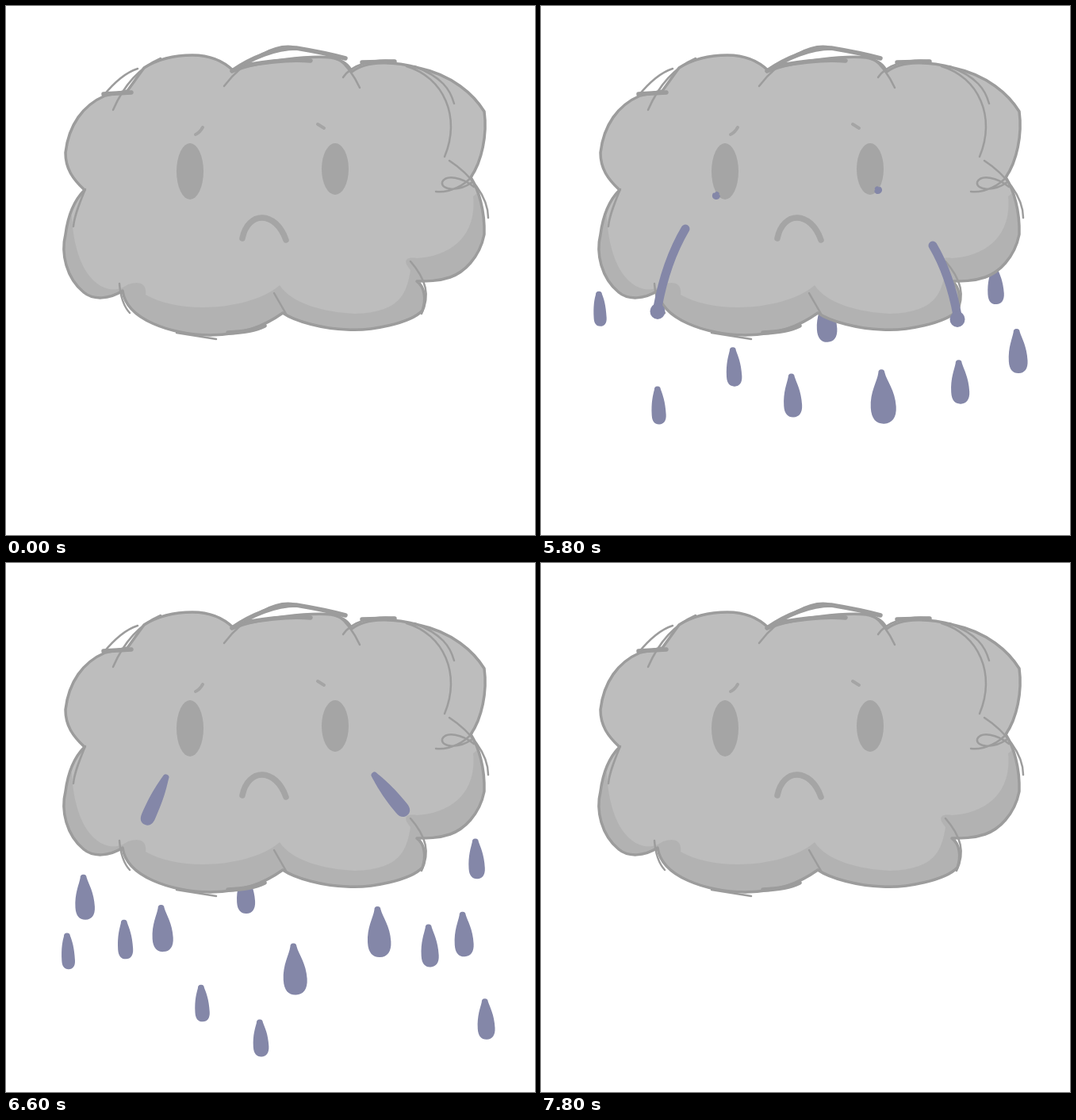
These frames come from a looping animation (667 px wide and 667 px high, 8000 ms). An HTML page with a canvas:

```html
<!DOCTYPE html>
<html lang="en">
<head>
<meta charset="utf-8">
<title>Rain cloud</title>
<style>
  html, body { margin: 0; width: 100%; height: 100%; overflow: hidden; background: #fff; }
  canvas { display: block; width: 100vw; height: 100vh; }
</style>
</head>
<body>
<canvas id="stage" width="667" height="667"></canvas>
<script>
const ctx = document.getElementById('stage').getContext('2d');
const LOOP = 8000, RAIN_START = 5000, STEP = 200, RAIN_STEPS = 14;
const BLUE = '#8487a8', LINE = '#9c9c9c', FEATURE = '#a5a5a5';

const cloud = new Path2D(`M99 232C84 218 75 205 75 185C79 150 97 125 125 113L153 107L174 78
  C193 66 212 62 235 62C258 62 275 70 287 82C320 69 385 62 410 65C425 68 433 76 436 83
  C455 68 490 70 520 78C563 87 590 112 603 133C607 162 600 196 586 216
  C596 232 604 258 603 288C597 318 577 336 560 342C545 347 531 347 518 347
  C528 354 530 370 525 384C510 400 460 410 430 408C400 407 365 398 349 387
  C325 404 300 414 258 415C208 414 152 396 147 359C130 370 110 371 98 361
  C76 343 69 312 75 288C78 265 86 245 99 232Z`);

const litArea = new Path2D(`M60 30H640V200L589 240C594 290 560 316 518 318C503 316 500 322 510 333
  C505 365 495 386 440 388C400 386 360 375 345 352C310 383 220 390 176 364
  C178 350 168 346 154 351C145 357 140 358 130 357C100 350 85 310 83 265L60 200Z`);

const boldLines = new Path2D(`M285 82C310 65 340 53 366 53C390 57 410 61 428 66
  M302 75C335 69 365 67 384 69M123 111L158 109M449 71L490 70M280 412Q310 411 326 403`);

const sketchLines = new Path2D(`M135 131C145 108 163 80 195 66M122 114C135 98 150 84 166 79
  M275 101C300 68 345 42 370 54M425 90C435 75 460 66 490 69
  M418 66C430 75 440 90 446 103M505 76C552 90 574 140 553 190M515 76C550 90 560 105 565 123
  M542 234C560 236 580 225 588 214M559 195C585 212 608 240 608 267
  M588 222C570 235 548 232 550 222C555 212 575 216 590 228
  M510 322C530 345 535 365 524 388M143 350Q145 375 156 387M215 412L265 420
  M100 231C92 250 86 265 85 278M338 362L353 388`);

const brows = new Path2D('M239 162Q244 160 248 153M393 149L401 154');
const mouth = new Path2D('M298 293C305 258 340 258 353 295');
const beads = new Path2D(`M602 254Q606 278 602 300M531 351Q534 364 532 376M142 373L147 390
  M317 409L324 404M417 410Q427 417 436 411`);

const mix = (a, b, u) => a + (b - a) * u;
const smooth = u => u * u * (3 - 2 * u);

function stroke(path, color, width) {
  ctx.strokeStyle = color;
  ctx.lineWidth = width;
  ctx.stroke(path);
}

function ellipse(x, y, rx, ry, color) {
  ctx.fillStyle = color;
  ctx.beginPath();
  ctx.ellipse(x, y, rx, ry, 0, 0, 7);
  ctx.fill();
}

// Teardrop centred on a point, its round end facing (dx, dy).
function drawDrop(x, y, dx, dy, width, height) {
  const r = width / 2, tip = Math.min(4, r * .6), top = -height / 2, bottom = height / 2;
  const shoulder = bottom - Math.min(r * 1.3, height * .5);
  ctx.save();
  ctx.translate(x, y);
  ctx.rotate(Math.atan2(-dx, dy));
  ctx.fillStyle = BLUE;
  ctx.beginPath();
  for (const side of [1, -1]) {
    ctx.moveTo(0, top);
    ctx.quadraticCurveTo(tip * side, top, tip * side, top + tip);
    ctx.bezierCurveTo(tip * 1.5 * side, top + height * .22, r * side, top + height * .4, r * side, shoulder);
    ctx.bezierCurveTo(r * side, bottom - r * .4, r * .6 * side, bottom, 0, bottom);
  }
  ctx.fill();
  ctx.restore();
}

// A raindrop falls evenly, drifts slightly right, swells and shrinks again.
const rain = (from, to, x, startY, endY, width) => step => {
  if (step < from || step > to) return;
  const u = (step - from) / (to - from);
  const size = .85 + .15 * Math.sin(Math.PI * u);
  drawDrop(x + step - from, mix(startY, endY, u), 1, 18, width * size, (22 + 1.45 * width) * size);
};

// The first tear stretches from the eye into a streak with a blob at its end.
const streak = (eyeX, eyeY, tipX, tipY, endX, endY) => step => {
  if (step > 4) return;
  const u = step / 4;
  const x = mix(eyeX, endX, u), y = mix(eyeY, endY, u);
  const startX = mix(eyeX, tipX, u * u), startY = mix(eyeY, tipY, u * u);
  const path = new Path2D();
  path.moveTo(startX, startY);
  path.quadraticCurveTo(mix(startX, x, .7), mix(startY, y, .42), x, y);
  stroke(path, BLUE, 8 + 3 * u);
  ellipse(x, y + 5 * u, mix(4, 9.5, u), mix(4, 10, u), BLUE);
};

// The second tear slides outwards over the cheek, then falls straight down.
const tear = (eyeX, eyeY, reach) => step => {
  const age = step - 4;
  if (age < 0) return;
  const pathX = t => eyeX + reach * smooth(Math.min(t / 8, 1));
  const pathY = t => eyeY + 255 * (t / 9) ** 1.8;
  const x = pathX(age), y = pathY(age);
  drawDrop(x, y, pathX(age + .1) - x, pathY(age + .1) - y,
    Math.min(18, 10 + 3.5 * age), Math.min(70, 10 + 3.7 * age * age));
};

const behind = [
  rain(2, 11, 72, 328, 570, 17),
  rain(1, 7, 145, 424, 583, 18),
  rain(2, 9, 241, 405, 580, 20),
  rain(1, 8, 314, 410, 599, 23),
  rain(1, 7, 428, 395, 590, 32),
  rain(1, 7, 525, 360, 588, 23),
  rain(1, 9, 598, 330, 610, 24),
  rain(4, 11, 573, 352, 555, 24),
  rain(4, 11, 360, 396, 599, 30),
  rain(6, 9, 97, 372, 446, 25),
  rain(6, 13, 195, 420, 562, 27),
  rain(6, 12, 468, 410, 575, 30),
  rain(8, 13, 302, 416, 550, 27)
];

const inFront = [
  streak(220, 237, 182, 281, 147, 380),
  streak(428, 231, 494, 302, 525, 390),
  rain(5, 11, 147, 371, 578, 19),
  rain(5, 11, 531, 390, 575, 22),
  rain(6, 13, 591, 318, 510, 21),
  tear(221, 239, -64),
  tear(425, 232, 118)
];

function drawCloud() {
  ctx.fillStyle = '#b2b2b2';
  ctx.fill(cloud);
  ctx.save();
  ctx.clip(cloud);
  ctx.fillStyle = '#bdbdbd';
  ctx.fill(litArea);
  ctx.restore();
  stroke(cloud, LINE, 3.5);
  stroke(boldLines, LINE, 5.5);
  stroke(sketchLines, LINE, 2.5);
  ellipse(232, 208.5, 17, 35.5, FEATURE);
  ellipse(415, 205.5, 17, 32.5, FEATURE);
  stroke(brows, FEATURE, 4);
  stroke(mouth, FEATURE, 7.5);
}

function frame() {
  const step = Math.floor((performance.now() % LOOP - RAIN_START) / STEP);
  const raining = step >= 0 && step < RAIN_STEPS;
  ctx.fillStyle = '#fff';
  ctx.fillRect(0, 0, 667, 667);
  ctx.lineCap = ctx.lineJoin = 'round';
  if (raining) behind.forEach(draw => draw(step));
  drawCloud();
  if (raining) inFront.forEach(draw => draw(step));
  if (step === 0) {
    stroke(beads, BLUE, 9);
    ellipse(147, 390, 8.5, 9, BLUE);
  }
  requestAnimationFrame(frame);
}
frame();
</script>
</body>
</html>
```
